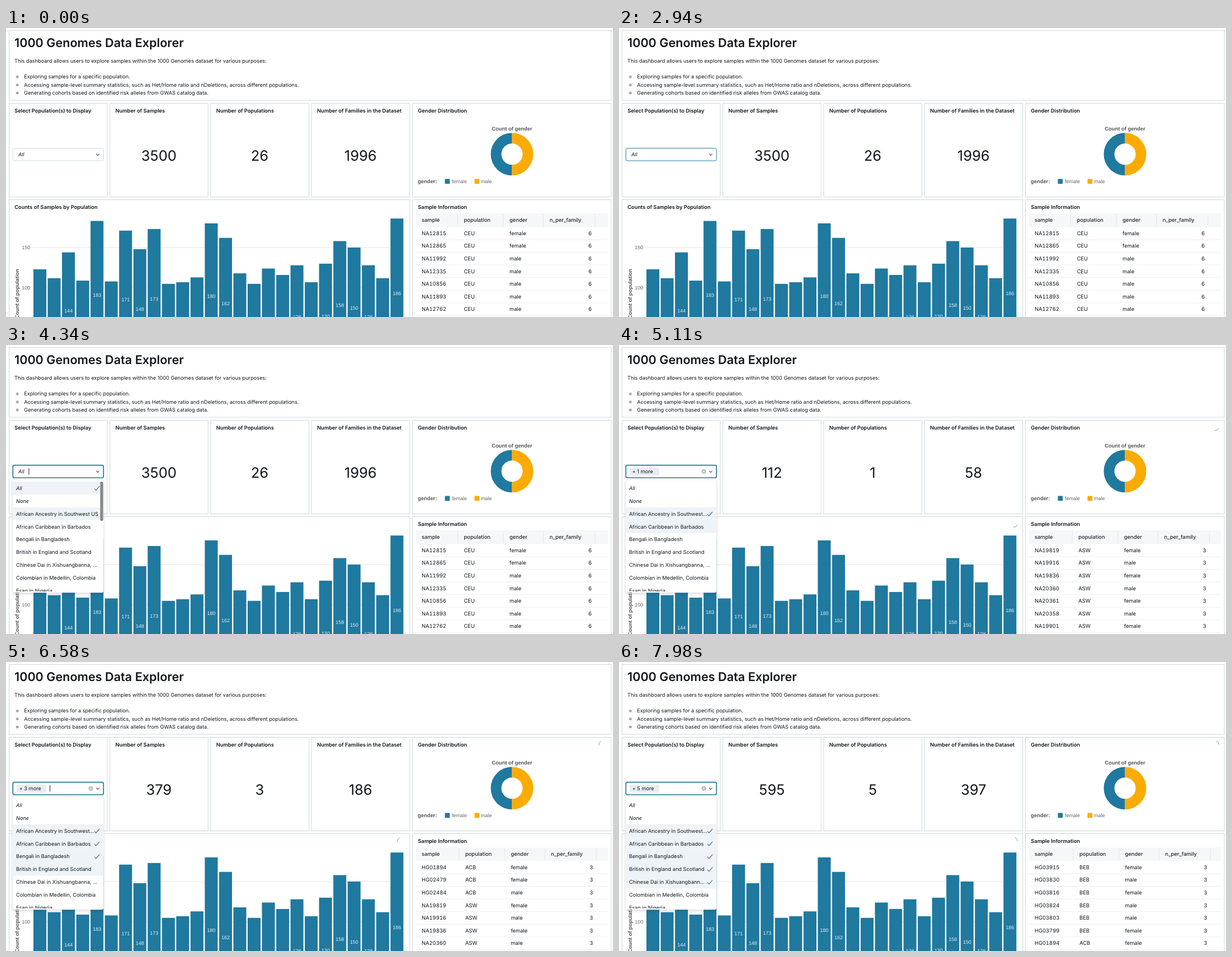
Recreate the animation shown at these times as an HTML page. Size 1085 by 516 pixels, loop 8000 ms.

```html
<!DOCTYPE html>
<html lang="en">
<head>
<meta charset="utf-8">
<title>1000 Genomes Data Explorer</title>
<style>
html, body { margin: 0; width: 100%; height: 100%; overflow: hidden; background: #fff; }
svg { display: block; width: 100%; height: 100%; }
text { font: 9.2px Inter, "Open Sans", sans-serif; fill: #11171c; text-rendering: geometricPrecision; white-space: pre; }
.h1 { font-size: 21.6px; font-weight: 600; }
.head { font-size: 9.3px; font-weight: 600; }
.big { font-size: 25.5px; text-anchor: middle; }
.cell { font-size: 9.4px; font-variant-numeric: tabular-nums; }
.col { font-size: 9.4px; font-weight: 500; fill: #1f272d; }
.it { font-style: italic; }
.chart { font: 9px "Liberation Sans", Arial, sans-serif; fill: #666; }
.ctitle { font: bold 9.4px "Liberation Sans", Arial, sans-serif; fill: #555; }
.bar { fill: #dcebf2; text-anchor: middle; }
.end { text-anchor: end; }
.mid { text-anchor: middle; }
</style>
</head>
<body>
<svg id="stage" viewBox="0 0 1085 516">
  <defs>
    <clipPath id="listClip"><rect x="12" y="241" width="162" height="199"/></clipPath>
    <filter id="shade" x="-20%" y="-20%" width="140%" height="140%">
      <feDropShadow dx="0" dy="2" stdDeviation="2.5" flood-color="#000" flood-opacity=".16"/>
    </filter>
  </defs>
  <g id="base"></g>
  <g id="live"></g>
</svg>
<script>
const LOOP = 8000, STEP = 70;
const BLUE = '#20799f', GOLD = '#fbab04', TINT = '#eef3f7';

const text = (x, y, s, cls = '', extra = '') => `<text x="${x}" y="${y}" class="${cls}" ${extra}>${s}</text>`;
const rect = (x, y, w, h, fill, extra = '') => `<rect x="${x}" y="${y}" width="${w}" height="${h}" fill="${fill}" ${extra}/>`;
const path = (d, stroke, width = 1, extra = '') =>
  `<path d="${d}" fill="none" stroke="${stroke}" stroke-width="${width}" ${extra}/>`;
const card = (x, y, w, h) => rect(x, y, w, h, '#fff', 'stroke="#cdd7da"');

const options = [
  'All', 'None', 'African Ancestry in Southwest US', 'African Caribbean in Barbados',
  'Bengali in Bangladesh', 'British in England and Scotland', 'Chinese Dai in Xishuangbanna, ...',
  'Colombian in Medellin, Colombia', 'Esan in Nigeria'
];
const shortened = { 2: 'African Ancestry in Southwest...', 6: 'Chinese Dai in Xishuangbann...' };

// samples, populations, families by number of chosen populations
const totals = [[3500, 26, 1996], [112, 1, 58], [235, 2, 121], [379, 3, 186], [486, 4, 292], [595, 5, 397]];

const tables = {
  all: { shift: 0, family: 6, rows: 'NA12815 CEU f,NA12865 CEU f,NA11992 CEU m,NA12335 CEU m,NA10856 CEU m,NA11893 CEU m,NA12762 CEU m' },
  two: { shift: 2.7, family: 3, rows: 'NA19819 ASW f,NA19916 ASW m,NA19836 ASW f,NA20360 ASW m,NA20361 ASW f,NA20358 ASW m,NA19901 ASW f' },
  three: { shift: 2.4, family: 3, rows: 'HG01894 ACB f,HG02479 ACB f,HG02484 ACB m,NA19819 ASW f,NA19916 ASW m,NA19836 ASW f,NA20360 ASW m' },
  five: { shift: 4.5, family: 3, rows: 'HG03915 BEB f,HG03830 BEB m,HG03816 BEB f,HG03824 BEB m,HG03803 BEB m,HG03799 BEB f,HG01894 ACB f' }
};
const tableFor = ['all', 'two', 'two', 'three', 'five', 'five'];

const HOVER = 2940, OPEN = 3290, BUSY = 4900, LAG = 210;
const clicks = [4830, 5250, 5950, 6790, 7420];
const pointer = [[OPEN, 0], [4130, 2], [4200, 3], [4340, 2], [5110, 3], [5740, 4], [6510, 5], [7280, 6]];

function drawBars() {
  const counts = [123, 112, 144, 109, 183, 108, 171, 148, 173, 105, 107, 113, 180,
    162, 118, 105, 124, 116, 128, 107, 130, 158, 150, 128, 112, 186];
  const zero = 608, unit = 1.44;
  let out = '';
  for (const v of [100, 150]) {
    const y = zero - v * unit;
    out += path(`M48 ${y}H712`, '#e4e4e4') + text(43.3, y + 3.2, v, 'chart end');
  }
  counts.forEach((v, i) => {
    const x = 49 + i * 25.53;
    out += rect(x, zero - v * unit, 23.1, v * unit, BLUE);
    out += text(x + 11.6, zero - v * unit / 2 + 3.4, v, 'chart bar');
  });
  return out + text(0, 0, 'Count of population', 'ctitle end', 'transform="translate(23.4 430) rotate(-90)"');
}

function drawDonut() {
  const half = (sweep, color) => path(`M904.5 196.8A28.5 28.5 0 0 ${sweep} 904.5 253.8`, color, 19);
  return text(904.5, 183, 'Count of gender', 'ctitle mid') +
    half(0, BLUE) + half(1, GOLD) +
    text(736, 277, 'gender:', 'ctitle') +
    rect(784.5, 269.5, 8.7, 8.7, BLUE) + text(797, 276.6, 'female', 'chart') +
    rect(837.5, 269.5, 8.7, 8.7, GOLD) + text(849, 276.6, 'male', 'chart');
}

function drawBase() {
  let out = card(5.5, 4.5, 1076.5, 124.5);
  out += text(15, 34.2, '1000 Genomes Data Explorer', 'h1');
  out += text(15, 62.2, 'This dashboard allows users to explore samples within the 1000 Genomes dataset for various purposes:');
  [
    'Exploring samples for a specific population.',
    'Accessing sample-level summary statistics, such as Het/Home ratio and nDeletions, across different populations.',
    'Generating cohorts based on identified risk alleles from GWAS catalog data.'
  ].forEach((s, i) => {
    const y = 90.2 + i * 14.3;
    out += text(32.3, y, s) + `<circle cx="20.3" cy="${y - 2.8}" r="1.7" fill="none" stroke="#333" stroke-width=".9"/>`;
  });
  ['Select Population(s) to Display', 'Number of Samples', 'Number of Populations', 'Number of Families in the Dataset']
    .forEach((s, i) => {
      const x = 5.5 + i * 180.2;
      out += card(x, 134.5, 175.5, 167) + text(x + 9.8, 150.8, s, 'head');
    });
  out += card(726.5, 134.5, 355.5, 167) + text(736.3, 150.8, 'Gender Distribution', 'head') + drawDonut();
  out += card(5.5, 306.5, 716.2, 300) + text(15.2, 323.4, 'Counts of Samples by Population', 'head') + drawBars();
  out += card(726.5, 306.5, 355.5, 300) + text(736.3, 323.4, 'Sample Information', 'head');
  return out;
}

function drawTable({ shift, family, rows }) {
  let out = rect(732.5, 331, 343.5, 24.5, '#f6f7f9');
  out += text(743, 346.3, 'sample', 'col');
  [['population', 807.5], ['gender', 889], ['n_per_family', 960.7], ['', 1052.7]].forEach(([s, x]) => {
    out += path(`M${x + shift} 332.5V353.5`, '#e3e7ea') + text(x + shift + 11, 346.3, s, 'col');
  });
  rows.split(',').forEach((row, i) => {
    const [id, pop, sex] = row.split(' ');
    const y = 369.9 + i * 22.55;
    out += text(743, y, id, 'cell') + text(818.5 + shift, y, pop, 'cell');
    out += text(900 + shift, y, sex === 'f' ? 'female' : 'male', 'cell');
    out += text(1047 + shift * 0.95, y, family, 'cell end');
    out += path(`M732.5 ${y + 8.1}H1076`, '#ebeef0');
  });
  return out;
}

function drawSelect(t, chosen) {
  const open = t >= OPEN;
  const border = t < HOVER ? '#d3dbdf' : BLUE;
  let out = rect(12.3, 214.7, 162, 22.3, '#fff', `rx="2.8" stroke="${border}" stroke-width="${open ? 1.7 : 1}"`);
  out += path('M161.2 224.7l2.7 2.8l2.7 -2.8', '#4c5a63', 1.1);
  if (chosen) {
    out += rect(18.7, 219, 53.3, 14, '#e8edf0', 'rx="2.5"') + text(23.7, 229.2, `+ ${chosen} more`);
    out += '<circle cx="151.6" cy="225.8" r="4" fill="#b9bdc0"/>' + path('M150 224.2l3.2 3.2m0 -3.2l-3.2 3.2', '#fff', 0.9);
  } else {
    out += text(22, 229.2, 'All', 'it');
  }
  if (open && (t - OPEN) % 1050 < 490) out += path(`M${chosen ? 78.6 : 41} 220V231.3`, '#11171c');
  return out;
}

function drawList(t, chosen) {
  let hover = 0;
  for (const [at, row] of pointer) if (t >= at) hover = row;
  let out = rect(12, 240.5, 162, 201.5, '#fff', 'rx="3" stroke="#dfe4e7" stroke-width=".6" filter="url(#shade)"');
  out += '<g clip-path="url(#listClip)">';
  options.forEach((s, i) => {
    const y = 255.5 + i * 22.9;
    const picked = chosen ? i > 1 && i < chosen + 2 : i === 0;
    if (picked || i === hover) out += rect(12.3, y - 11.5, 161.4, 23, TINT);
    out += text(18, y + 3.3, picked && shortened[i] || s, i < 2 ? 'it' : '');
    if (picked) out += path(`M158 ${y + 0.8}l2.9 3l6.2 -7.2`, '#4f6069', 1.1);
  });
  out += '</g>';
  const fade = 1 - Math.min(1, Math.max(0, (t - 4830) / 210));
  if (fade) out += rect(168.4, 244, 5.2, 70, '#858788', `rx="2.2" opacity="${fade}"`);
  return out;
}

function spinner(cx, cy, t) {
  const mid = 204 + (t - 5530) / 1050 * 360;
  const at = deg => {
    const a = deg * Math.PI / 180;
    return `${cx + 6 * Math.cos(a)} ${cy + 6 * Math.sin(a)}`;
  };
  return path(`M${at(mid - 42)}A6 6 0 0 1 ${at(mid + 42)}`, '#8d969c', 1);
}

function drawLive(t) {
  const chosen = clicks.filter(c => t >= c).length;
  const loaded = clicks.filter(c => t >= c + LAG).length;
  let out = totals[loaded].map((v, i) => text(273.3 + i * 180.2, 236.6, v, 'big')).join('');
  out += drawTable(tables[tableFor[loaded]]);
  out += drawSelect(t, chosen);
  if (t >= OPEN) out += drawList(t, chosen);
  if (t >= BUSY) out += spinner(1066, 146.8, t) + spinner(706, 319.3, t);
  return out;
}

const live = document.getElementById('live');
document.getElementById('base').innerHTML = drawBase();

let start, shown = -1;
function tick(now) {
  start ??= now;
  const t = Math.floor((now - start) % LOOP / STEP) * STEP;
  if (t !== shown) {
    shown = t;
    live.innerHTML = drawLive(t);
  }
  requestAnimationFrame(tick);
}
live.innerHTML = drawLive(0);
requestAnimationFrame(tick);
</script>
</body>
</html>
```
